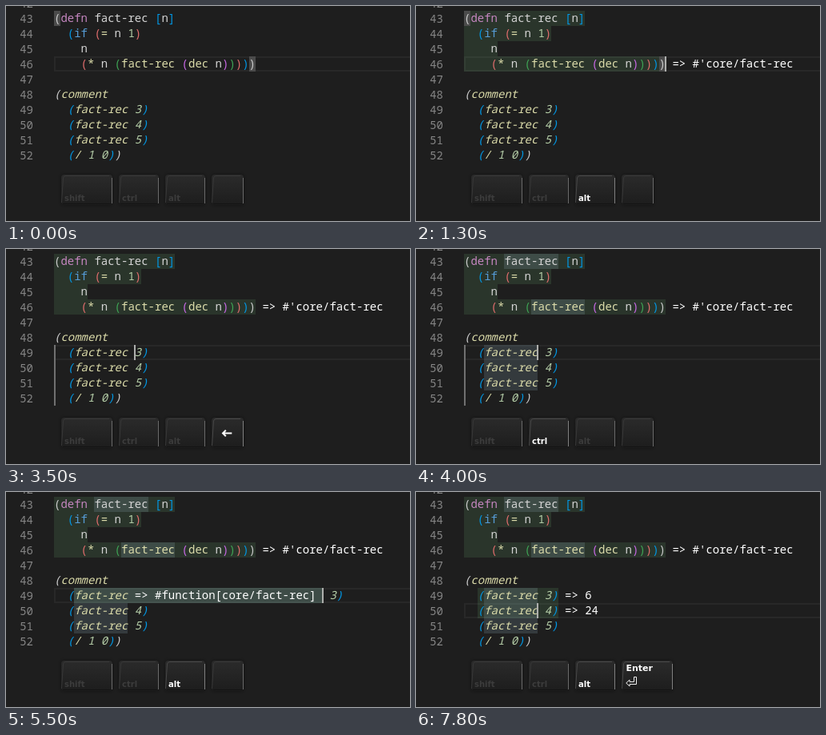
These frames come from a looping animation (505x269 px, 8 s). An HTML page with a canvas:

```html
<!DOCTYPE html>
<html lang="en">
<head>
<meta charset="utf-8">
<title>Evaluating code in an editor</title>
<style>
html, body { margin: 0; width: 100%; height: 100%; overflow: hidden; background: #1e1e1e; }
canvas { display: block; }
</style>
</head>
<body>
<canvas id="stage" width="505" height="269"></canvas>
<script>
const ctx = document.getElementById('stage').getContext('2d');
const LOOP = 8000;
const LEFT = 60, CHAR = 8.4, ROW = 19, FIRST = 43;
const MONO = "14px 'Noto Sans Mono', 'DejaVu Sans Mono', monospace";
const RAINBOW = ['#cccccc', '#0098e6', '#e16d6d', '#3fa455', '#c968e6'];
const KEYWORDS = { defn: '#c586c0', if: '#569cd6' };
const RESULT_TINT = 'rgba(130, 222, 138, 0.12)';
const WORD_TINT = 'rgba(140, 170, 185, 0.2)';

const SOURCE = [
  '(defn fact-rec [n]',
  '  (if (= n 1)',
  '    n',
  '    (* n (fact-rec (dec n)))))',
  '',
  '(comment',
  '  (fact-rec 3)',
  '  (fact-rec 4)',
  '  (fact-rec 5)',
  '  (/ 1 0))'
];
const INLINE = ' => #function[core/fact-rec] ';

// Every step changes only the named parts of the state.
const STEPS = [
  [0, { line: 46, col: 30, caret: false, pairs: [[43, 0], [46, 29]], alt: false, ctrl: false,
        key: '', defined: false, guide: false, words: false, inline: false, three: false, four: false }],
  [100, { caret: true }],
  [400, { alt: true }],
  [600, { key: 'enter', caret: false }],
  [700, { defined: true }],
  [1100, { caret: true }],
  [1300, { key: '' }],
  [1500, { alt: false }],
  [1600, { caret: false }],
  [2100, { line: 47, col: 0, caret: true, pairs: [], key: 'down' }],
  [2500, { line: 48, col: 8, guide: true }],
  [2700, { line: 49, col: 14 }],
  [2800, { pairs: [[49, 2], [49, 13]] }],
  [3200, { key: 'left' }],
  [3300, { col: 13, pairs: [] }],
  [3500, { col: 12 }],
  [3800, { col: 11, words: true }],
  [4000, { key: '', ctrl: true }],
  [4100, { key: 'enter' }],
  [4200, { inline: true, guide: false, caret: false, col: 40 }],
  [4700, { caret: true }],
  [4900, { key: '' }],
  [5000, { ctrl: false }],
  [5100, { caret: false }],
  [5400, { alt: true }],
  [5500, { caret: true }],
  [6000, { key: 'enter', inline: false, three: true, col: 11, caret: false }],
  [6600, { key: '', caret: true }],
  [6800, { alt: false }],
  [6900, { key: 'down', line: 50, guide: true }],
  [7100, { alt: true }],
  [7300, { key: '' }],
  [7400, { caret: false }],
  [7600, { key: 'enter' }],
  [7700, { four: true, guide: false }],
  [7800, { caret: true }]
];

const rowTop = line => 6 + (line - FIRST) * ROW;
const colX = col => LEFT + col * CHAR;

function tokenize(lines) {
  let depth = 0;
  return lines.map(text => {
    const out = [];
    let prev = '';
    for (const m of text.matchAll(/[()\[\]]|[^\s()\[\]]+/g)) {
      const word = m[0];
      let color = '#d4d4d4';
      if ('(['.includes(word)) color = RAINBOW[depth++];
      else if (')]'.includes(word)) color = RAINBOW[--depth];
      else if (/^\d+$/.test(word)) color = '#b5cea8';
      else if (KEYWORDS[word]) color = KEYWORDS[word];
      else if (prev === '(') color = '#dcdcaa';
      out.push({ word, color, col: m.index });
      prev = word;
    }
    return out;
  });
}
const TOKENS = tokenize(SOURCE);

function stateAt(ms) {
  const state = {};
  for (const [at, change] of STEPS) {
    if (at > ms) break;
    Object.assign(state, change);
  }
  return state;
}

function band(line, from, to, color) {
  const x = Math.round(colX(from));
  ctx.fillStyle = color;
  ctx.fillRect(x, rowTop(line), Math.round(colX(to)) - x, ROW);
}

function write(text, line, col, color, italic) {
  ctx.font = (italic ? 'italic ' : '') + MONO;
  ctx.fillStyle = color;
  ctx.fillText(text, colX(col), rowTop(line) + 14);
}

function drawBands(s) {
  ctx.strokeStyle = '#282828';
  ctx.lineWidth = 2;
  ctx.strokeRect(LEFT + 1, rowTop(s.line) + 1, 460, ROW - 2);
  if (s.defined) {
    for (let i = 0; i < 4; i++) band(FIRST + i, 0, SOURCE[i].length, RESULT_TINT);
  }
  if (s.inline) band(49, 3, 40, RESULT_TINT);
  if (s.three) band(49, 2, 14, RESULT_TINT);
  if (s.four) band(50, 2, 14, RESULT_TINT);
  if (s.words) {
    band(43, 6, 14, WORD_TINT);
    band(46, 10, 18, WORD_TINT);
    band(49, 3, s.inline ? 40 : 11, WORD_TINT);
    band(50, 3, 11, WORD_TINT);
    band(51, 3, 11, WORD_TINT);
  }
  for (const [line, col] of s.pairs) band(line, col, col + 1, '#4b4b4b');
  if (s.guide) {
    ctx.fillStyle = '#707070';
    ctx.fillRect(LEFT, rowTop(49), 2, 4 * ROW);
  }
}

function drawText(s) {
  ctx.font = MONO;
  ctx.fillStyle = '#858585';
  for (let line = 42; line <= 52; line++) ctx.fillText(line, 17.2, rowTop(line) + 15);
  TOKENS.forEach((tokens, i) => {
    const line = FIRST + i;
    for (const t of tokens) {
      const shift = s.inline && line === 49 && t.col >= 11 ? INLINE.length : 0;
      write(t.word, line, t.col + shift, t.color, line >= 48);
    }
  });
  if (s.defined) write("=> #'core/fact-rec", 46, 31, '#ffffff');
  if (s.inline) write(INLINE, 49, 11, '#ffffff');
  if (s.three) write('=> 6', 49, 15, '#ffffff');
  if (s.four) write('=> 24', 50, 15, '#ffffff');
  if (s.caret) {
    ctx.fillStyle = '#aeafad';
    ctx.fillRect(Math.round(colX(s.col)) - (s.col ? 1 : 0), rowTop(s.line), 2, ROW);
  }
}

function drawCap(x, w, lit) {
  const y = 211, h = 38;
  const body = ctx.createLinearGradient(0, y, 0, y + h);
  body.addColorStop(0, '#2b2b2b');
  body.addColorStop(0.5, '#242424');
  body.addColorStop(1, '#1d1d1d');
  ctx.save();
  ctx.shadowColor = 'rgba(0, 0, 0, 0.45)';
  ctx.shadowBlur = 5;
  ctx.fillStyle = body;
  ctx.beginPath();
  ctx.roundRect(x, y, w, h, 4);
  ctx.fill();
  ctx.restore();
  ctx.strokeStyle = lit ? '#484848' : '#383838';
  ctx.lineWidth = 1;
  ctx.beginPath();
  ctx.moveTo(x + 0.5, y + h - 3);
  ctx.lineTo(x + 2.5, y + 4);
  ctx.quadraticCurveTo(x + 3, y + 1.5, x + 6, y + 1.5);
  ctx.lineTo(x + w - 4, y + 1.5);
  ctx.stroke();
  ctx.fillStyle = '#141414';
  ctx.fillRect(x + 2, y + h - 2, w - 4, 1);
  ctx.fillStyle = lit ? '#808080' : '#6a6a6a';
  ctx.fillRect(x + w - 1, y + 4, 1, h - 6);
}

function label(text, x, y, size, lit) {
  ctx.font = `bold ${size}px 'DejaVu Sans', sans-serif`;
  ctx.fillStyle = lit ? '#ffffff' : '#3c3c3c';
  ctx.fillText(text, x, y);
}

function drawArrow(angle) {
  ctx.save();
  ctx.translate(276.3, 230.5);
  ctx.rotate(angle);
  ctx.lineWidth = 2;
  ctx.strokeStyle = '#ffffff';
  ctx.beginPath();
  ctx.moveTo(6, 0);
  ctx.lineTo(-5, 0);
  ctx.moveTo(-1.5, -3.8);
  ctx.lineTo(-5.3, 0);
  ctx.lineTo(-1.5, 3.8);
  ctx.stroke();
  ctx.restore();
}

function drawReturn() {
  ctx.save();
  ctx.translate(262, 231);
  ctx.strokeStyle = '#f0f0f0';
  ctx.lineWidth = 1;
  ctx.beginPath();
  ctx.moveTo(10.5, 0.5);
  ctx.lineTo(13.5, 0.5);
  ctx.lineTo(13.5, 9.5);
  ctx.lineTo(5, 9.5);
  ctx.lineTo(5, 12);
  ctx.lineTo(0.7, 8);
  ctx.lineTo(5, 4);
  ctx.lineTo(5, 6.5);
  ctx.lineTo(10.5, 6.5);
  ctx.closePath();
  ctx.stroke();
  ctx.restore();
}

function drawKeys(s) {
  drawCap(69, 64, false);
  label('shift', 73, 244, 10, false);
  drawCap(141, 50, s.ctrl);
  label('ctrl', 145, 244, 10, s.ctrl);
  drawCap(199, 50, s.alt);
  label('alt', 203, 244, 10, s.alt);
  drawCap(257, s.key === 'enter' ? 64 : 40, s.key !== '');
  if (s.key === 'enter') {
    label('Enter', 262.5, 224, 11, true);
    drawReturn();
  }
  if (s.key === 'left') drawArrow(0);
  if (s.key === 'down') drawArrow(-Math.PI / 2);
}

function draw(ms) {
  const s = stateAt(ms);
  ctx.fillStyle = '#1e1e1e';
  ctx.fillRect(0, 0, 505, 269);
  drawBands(s);
  drawText(s);
  drawKeys(s);
}

let start;
function tick(now) {
  start ??= now;
  draw((now - start) % LOOP);
  requestAnimationFrame(tick);
}
draw(0);
requestAnimationFrame(tick);
</script>
</body>
</html>
```
